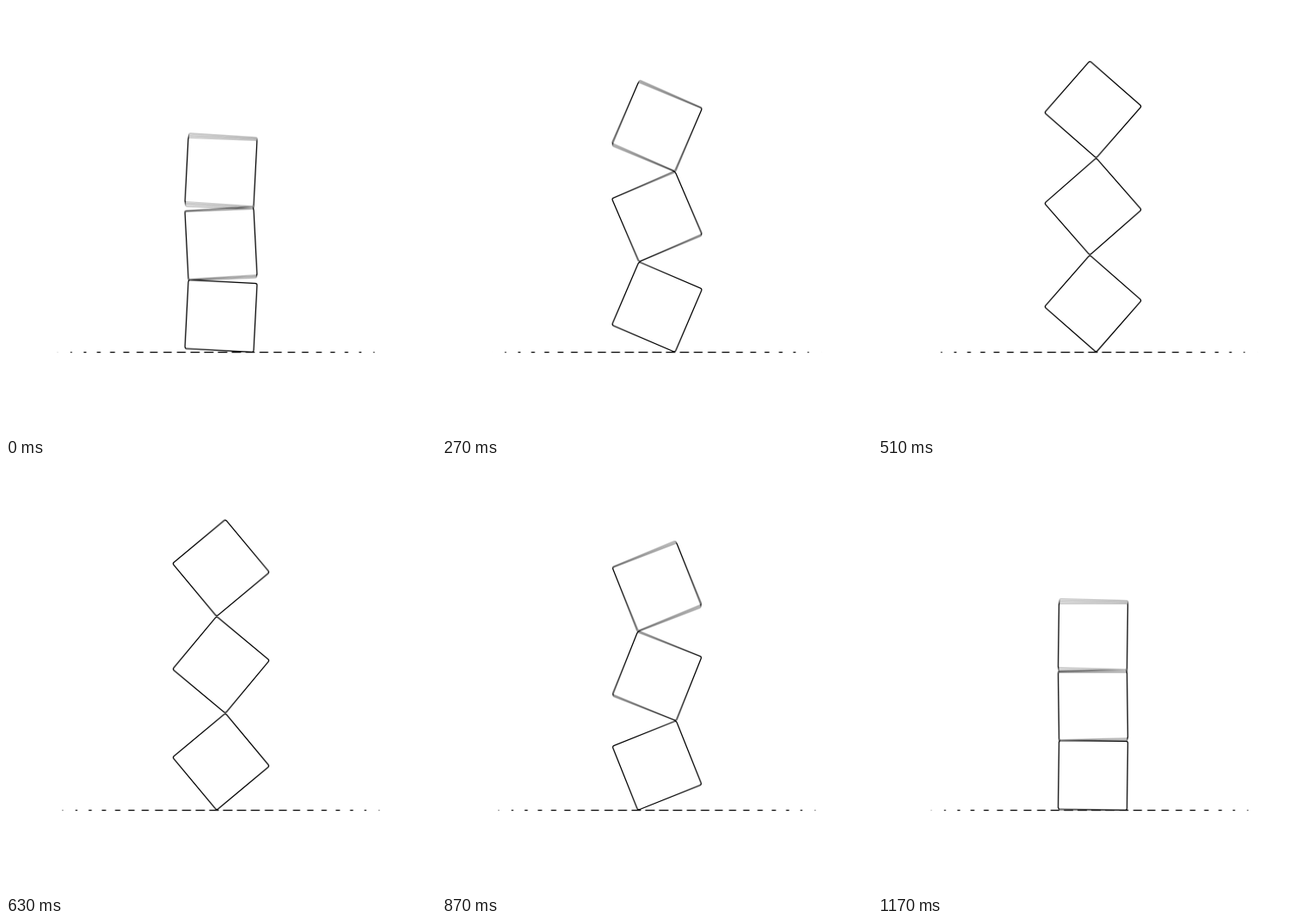
Animation of 500 by 500 pixels, one loop 1.2 s. Source, as an HTML page with a canvas:

```html
<!DOCTYPE html>
<html lang="en">
<head>
<meta charset="utf-8">
<title>Tumbling stack</title>
<style>
  html, body { margin: 0; width: 100%; height: 100%; overflow: hidden; background: #fff; }
  canvas { display: block; width: 500px; height: 500px; }
</style>
</head>
<body>
<canvas id="stage" width="500" height="500"></canvas>
<script>
const ctx = document.getElementById("stage").getContext("2d");
const STEP = 30, STEPS = 40;
const SAMPLES = 5, SHUTTER = 0.78;
const CENTER = 250, GROUND = 402.5, SIDE = 80, CORNER = 2;
const GAP = 16, REACH = 192, DASH = 11;

function addSquare(y, angle) {
  ctx.setTransform(1, 0, 0, 1, CENTER, y);
  ctx.rotate(angle);
  ctx.roundRect(-SIDE / 2, -SIDE / 2, SIDE, SIDE, CORNER);
}

function addStack(turn) {
  const angle = turn * Math.PI / 2;
  const height = SIDE * (Math.cos(angle) + Math.sin(angle));
  for (let k = 0; k < 3; k++) {
    addSquare(GROUND - height * (k + 0.5), k % 2 ? -angle : angle);
  }
  ctx.setTransform(1, 0, 0, 1, 0, 0);
}

function addGround(turn) {
  const shift = 4.5 - SIDE * turn;
  const first = Math.ceil((-REACH - shift) / GAP);
  for (let d = first * GAP + shift; d < REACH; d += GAP) {
    const half = DASH / 2 * Math.cos(d / REACH * Math.PI / 2);
    ctx.moveTo(CENTER + d - half, GROUND);
    ctx.lineTo(CENTER + d + half, GROUND);
  }
}

// Motion blur: every sample adds an equal share of ink.
function draw(step) {
  ctx.clearRect(0, 0, 500, 500);
  ctx.globalCompositeOperation = "lighter";
  ctx.globalAlpha = 1 / SAMPLES;
  ctx.lineWidth = 1.25;
  ctx.strokeStyle = "#000";
  for (let s = 0; s < SAMPLES; s++) {
    const turn = ((step + 1) % STEPS + SHUTTER * s / SAMPLES) / STEPS;
    ctx.beginPath();
    addStack(turn);
    addGround(turn);
    ctx.stroke();
  }
}

function tick() {
  draw(Math.floor((performance.now() + 0.5) / STEP) % STEPS);
  requestAnimationFrame(tick);
}
tick();
</script>
</body>
</html>
```
